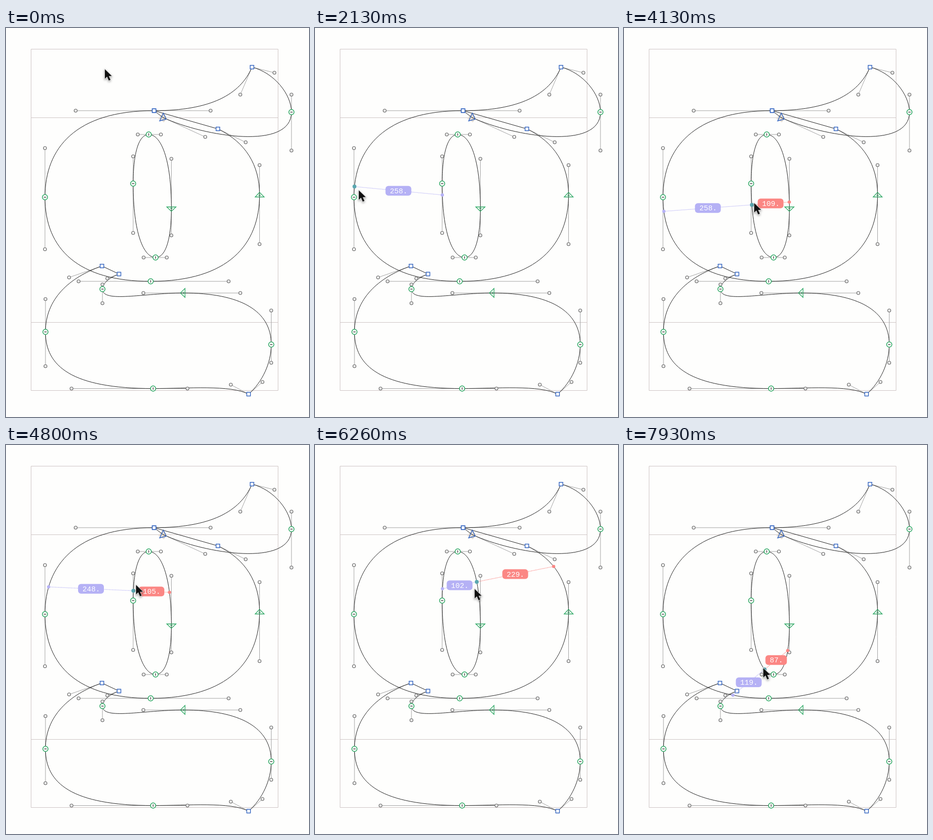
An HTML page with a canvas that plays this animation: 622 by 800 pixels, repeating every 8 s.

```html
<!DOCTYPE html>
<html lang="en">
<head>
<meta charset="utf-8">
<title>Measuring a glyph outline</title>
<style>
  html, body { margin: 0; width: 100%; height: 100%; overflow: hidden; background: #fefefd; }
  canvas { display: block; }
</style>
</head>
<body>
<canvas id="stage" width="622" height="800"></canvas>
<script>
const ctx = document.getElementById('stage').getContext('2d');
const LOOP = 8000, STEP = 200 / 3;
const UNITS_PER_PX = 1.425, REACH = 20;
const LILAC = '#b5b1f5', RED = '#fb8784', TEAL = '#5ba7b0';
const GREEN = '#27a55f', BLUE = '#3566c2';

const contours = [
  'M304,170 C143,170 80,247 80,348 C80,455 149,521 297,521 C457,521 520.5,444.5 520.5,343 C520.5,282 492,235 435,207.5 L304,170',
  'M304,170 C420,170 481,137 505,80.5 C551,92 586,137 586,173 C586,252 409,224 322,184 L304,170',
  'M293,219 C270.5,219 261,264 261,320 C261,421.5 282.5,472 307,472 C330,472 339.5,426.5 339.5,371 C339.5,269 318,219 293,219',
  'M197,489.5 C129.5,513 81,557.5 81,625 C81,695.5 134.5,741.5 302,741.5 C372.5,741.5 461.5,733.5 498,753 C526.5,728 544.5,688.5 544.5,651 C544.5,581 481,545 364,545 C282,545 198,566 198,537 C198,527.5 208,515 232,506 L197,489.5'
];
const corners = [[304, 170], [304, 170], [505, 80.5], [435, 207.5], [197, 489.5], [232, 506], [498, 753]];
// x, y, whether the handles run vertically
const smooth = [
  [80, 348, 1], [297, 521, 0], [586, 173, 1], [293, 219, 0], [261, 320, 1],
  [307, 472, 0], [81, 625, 1], [302, 741.5, 0], [544.5, 651, 1], [198, 537, 1]
];
const tangents = [
  'M520.5,338 L530,347.5 H511.5 Z M518,344 H523',
  'M339.5,377 L349,368 H330 Z M337,371 H342',
  'M358,545 L367.5,535.5 V554 Z M364.5,542.5 V547.5'
];

// time, x, y of the pointer
const pointerKeys = [
  [0, 203, 85], [933, 112, 238], [1530, 92, 297], [1735, 92, 297],
  [2067, 90, 327], [2133, 90, 334], [2500, 89, 366], [2667, 92, 366],
  [3050, 140, 406], [3333, 194, 397], [3533, 232, 386], [3750, 266, 378],
  [4333, 268, 351], [4733, 267, 300], [4800, 267, 288], [5200, 275, 233],
  [5400, 290, 216], [5600, 306, 221], [5667, 313, 216], [6067, 326, 255],
  [6733, 332, 392.5], [6800, 332, 400], [6933, 332, 428], [7120, 325, 457],
  [7300, 308, 478], [7500, 300, 475], [7700, 291, 468], [7867, 286, 463.6], [7933, 286, 459]
];

const lerp = (a, b, u) => a + (b - a) * u;
const mix = (p, q, u) => [lerp(p[0], q[0], u), lerp(p[1], q[1], u)];
const dist = (p, q) => Math.hypot(p[0] - q[0], p[1] - q[1]);

function pointOn(points, u) {
  while (points.length > 1) points = points.slice(1).map((p, i) => mix(points[i], p, u));
  return points[0];
}

const handles = [];
const edges = [];
for (const contour of contours) {
  let start;
  for (const part of contour.split(' C').join('|C').split(' L').join('|L').split('|')) {
    const points = part.slice(1).split(' ').map(p => p.split(',').map(Number));
    const end = points[points.length - 1];
    if (start) {
      const segment = [start, ...points];
      if (points.length === 3) handles.push([start, points[0]], [end, points[1]]);
      let previous = start;
      for (let i = 1; i <= 200; i++) {
        const next = pointOn(segment, i / 200);
        edges.push([previous, next]);
        previous = next;
      }
    }
    start = end;
  }
}

function pointerAt(t) {
  const i = pointerKeys.findIndex(key => key[0] > t);
  if (i < 1) return pointerKeys[i < 0 ? pointerKeys.length - 1 : 0].slice(1);
  const [a, b] = [pointerKeys[i - 1], pointerKeys[i]];
  return mix(a.slice(1), b.slice(1), (t - a[0]) / (b[0] - a[0]));
}

// Nearest outline point, with the first outline hit on each side along its normal.
function measure(probe) {
  let best = REACH, origin, normal;
  for (const [p, q] of edges) {
    const dx = q[0] - p[0], dy = q[1] - p[1], len = Math.hypot(dx, dy);
    const u = ((probe[0] - p[0]) * dx + (probe[1] - p[1]) * dy) / (len * len);
    const near = mix(p, q, Math.max(0, Math.min(1, u)));
    const d = dist(probe, near);
    if (d < best) {
      best = d;
      origin = near;
      normal = [-dy / len, dx / len];
    }
  }
  if (!origin) return null;
  let ahead = Infinity, behind = -Infinity;
  for (const [p, q] of edges) {
    const ex = q[0] - p[0], ey = q[1] - p[1];
    const px = p[0] - origin[0], py = p[1] - origin[1];
    const det = normal[0] * ey - normal[1] * ex;
    if (!det) continue;
    const along = (px * ey - py * ex) / det;
    const u = (px * normal[1] - py * normal[0]) / det;
    if (u < 0 || u > 1) continue;
    if (along > 3) ahead = Math.min(ahead, along);
    if (along < -3) behind = Math.max(behind, along);
  }
  const hits = [ahead, behind].filter(Number.isFinite)
    .map(d => [origin[0] + normal[0] * d, origin[1] + normal[1] * d])
    .sort((a, b) => a[0] - b[0]);
  return { origin, hits };
}

function paint(path, stroke, width, fill) {
  if (fill) { ctx.fillStyle = fill; ctx.fill(path); }
  if (stroke) { ctx.strokeStyle = stroke; ctx.lineWidth = width; ctx.stroke(path); }
}
function circle([x, y], r) {
  const path = new Path2D();
  path.arc(x, y, r, 0, 2 * Math.PI);
  return path;
}
function line(a, b) {
  const path = new Path2D();
  path.moveTo(...a);
  path.lineTo(...b);
  return path;
}

function drawGlyph() {
  paint(new Path2D('M51.5,43.5 H558.5 V745.5 H51.5 Z M51.5,184.5 H558.5 M51.5,605.5 H558.5'), '#cdc3c3', 1);
  paint(new Path2D('M322,174 L331,185 L324,194 L313,186 Z'), null, 0, '#e3dcd3');
  for (const [node, handle] of handles) paint(line(node, handle), '#a0a0a0', 1);
  for (const contour of contours) paint(new Path2D(contour), '#1c1c1c', 1);
  for (const [, handle] of handles) paint(circle(handle, 3.1), '#777', 1.4, '#fefefd');
  for (const [x, y] of corners) {
    const box = new Path2D();
    box.rect(x - 3.7, y - 3.7, 7.4, 7.4);
    paint(box, BLUE, 1.5, '#fefefd');
  }
  for (const [x, y, vertical] of smooth) {
    paint(circle([x, y], 5.4), GREEN, 1.5, '#fefefd');
    const [dx, dy] = vertical ? [2.5, 0] : [0, 2.5];
    paint(line([x - dx, y - dy], [x + dx, y + dy]), '#222', 1.2);
  }
  for (const shape of tangents) paint(new Path2D(shape), GREEN, 1.3);
  paint(new Path2D('M323,175 L329,187.5 L315.5,191 Z'), BLUE, 1.5);
}

function drawMeasure({ origin, hits }) {
  const colors = [LILAC, RED];
  ctx.setLineDash([1.5, 1.5]);
  hits.forEach((hit, i) => paint(line(origin, hit), colors[i], 1.4));
  ctx.setLineDash([]);
  hits.forEach((hit, i) => paint(circle(hit, 3.3), null, 0, colors[i]));
  paint(circle(origin, 4), null, 0, TEAL);
  ctx.font = '15px "Liberation Mono", monospace';
  ctx.textAlign = 'center';
  ctx.textBaseline = 'alphabetic';
  hits.forEach((hit, i) => {
    const [x, y] = mix(origin, hit, 0.5);
    const text = Math.floor(dist(origin, hit) * UNITS_PER_PX) + '.';
    const width = 17 + 9 * text.length;
    const label = new Path2D();
    label.roundRect(x - width / 2, y - 10, width, 20, 6);
    paint(label, null, 0, colors[i]);
    ctx.fillStyle = '#fff';
    ctx.fillText(text, x + 0.5, y + 5);
  });
}

const arrow = new Path2D('M0,0 V19 L4.5,15 L8,23 L11.5,21.5 L8,14 L14,13.5 Z');
function drawPointer([x, y]) {
  ctx.save();
  ctx.translate(x, y);
  ctx.shadowColor = 'rgba(0,0,0,.5)';
  ctx.shadowBlur = 4;
  ctx.shadowOffsetY = 2;
  paint(arrow, '#ddd', 1.6);
  ctx.shadowColor = 'transparent';
  paint(arrow, null, 0, '#111');
  if (handles.some(([, handle]) => dist(handle, [x, y]) < 7)) {
    const badge = new Path2D();
    badge.roundRect(13.5, 18.5, 10, 10, 2);
    paint(badge, null, 0, '#999');
    const hole = new Path2D();
    hole.rect(16.5, 21.5, 4, 4);
    paint(hole, '#eee', 1.2);
  }
  ctx.restore();
}

function frame(now) {
  // The pointer moves in 15 steps a second; the measurement trails it by one step.
  const t = Math.floor((now % LOOP + 7) / STEP) * STEP % LOOP;
  ctx.fillStyle = '#fefefd';
  ctx.fillRect(0, 0, 622, 800);
  drawGlyph();
  const result = measure(pointerAt(Math.max(0, t - STEP)));
  if (result) drawMeasure(result);
  drawPointer(pointerAt(t));
  requestAnimationFrame(frame);
}
requestAnimationFrame(frame);
</script>
</body>
</html>
```
